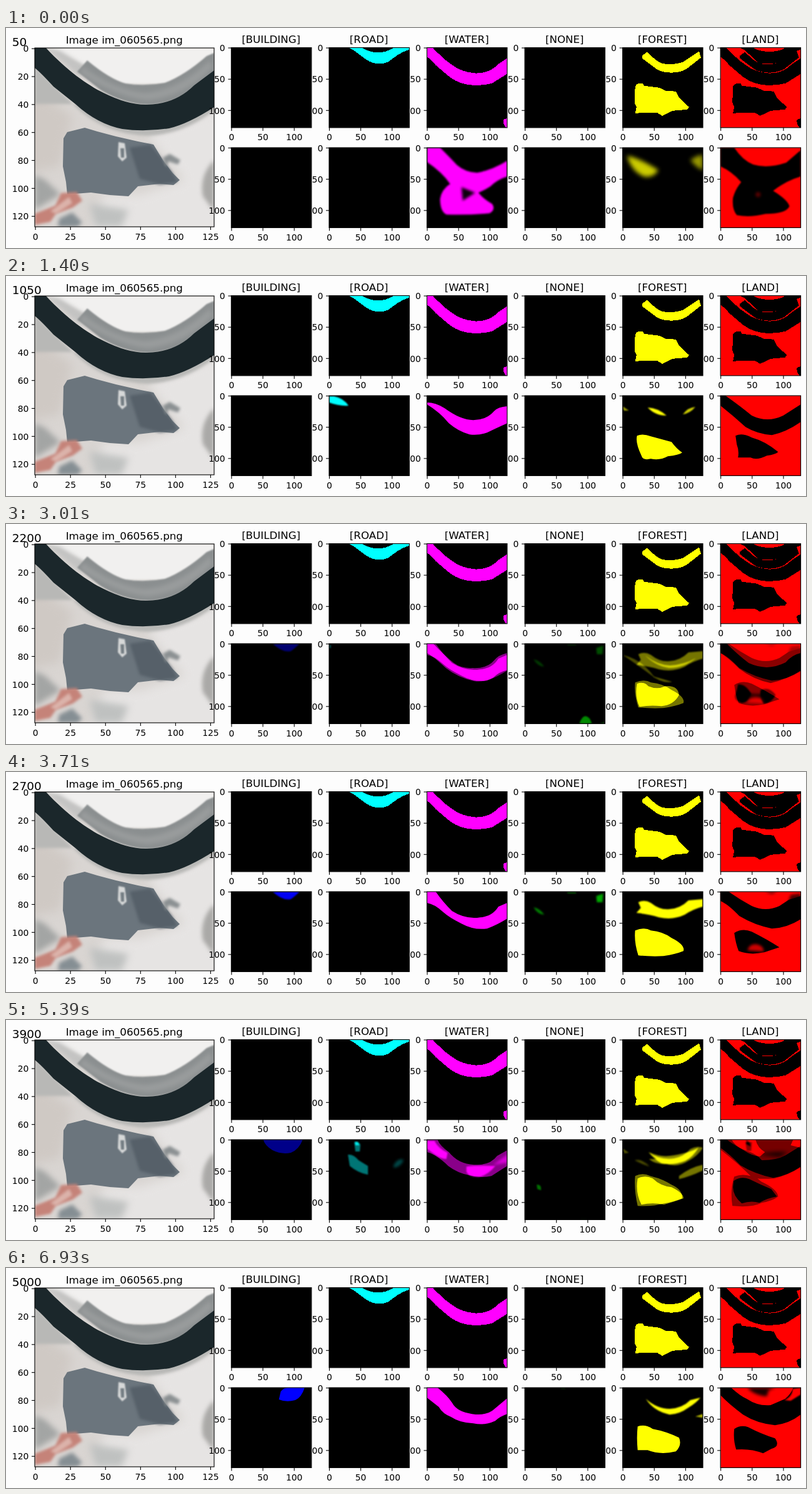
An HTML page that plays this animation: 1280x353 px, repeating every 7 s.

```html
<!DOCTYPE html>
<html lang="en">
<head>
<meta charset="utf-8">
<title>Segmentation training</title>
<style>
  html, body { margin: 0; width: 100%; height: 100%; overflow: hidden; background: #fdfdfd; }
  svg { display: block; }
  text { font: 13.89px "DejaVu Sans", sans-serif; }
  .title { font-size: 16.67px; text-anchor: middle; }
  .counter { font-size: 18.5px; }
</style>
</head>
<body>
<svg id="stage" width="1280" height="353" viewBox="0 0 1280 353"></svg>
<script>
const STEP_MS = 70, STEPS = 100, SIZE = 128.4, TOP = 31.5, BOTTOM = 192;
const stage = document.getElementById('stage');
const panels = [
  ['building', '#00f'], ['road', '#0ff'], ['water', '#f0f'],
  ['none', '#0f0'], ['forest', '#ff0'], ['land', '#000']
].map(([name, color], i) => ({ name, color, x: 360.4 + 156.55 * i, back: name === 'land' ? '#f00' : '#000' }));

function add(parent, tag, attrs, text) {
  const el = document.createElementNS('http://www.w3.org/2000/svg', tag);
  for (const key in attrs) el.setAttribute(key, attrs[key]);
  if (text !== undefined) el.textContent = text;
  return parent.appendChild(el);
}

const truth = {
  road: ['M31 0H52Q66 8 78 8T104 0H128V3C112 8 104 16 94 23Q80 29 64 22C50 14 42 4 31 0Z'],
  water: [
    'M0 0H9C18 9 28 20 42 29Q55 39 78 41Q100 41 113 27L128 17V42Q112 52 104 57Q84 62 64 59Q45 56 28 40L14 28Q6 18 0 15Z',
    'M122 115L128 113V128H126Q121 122 122 115Z'
  ],
  forest: [
    'M31 13L39 7Q54 22 62 25Q78 29 96 23L122 6L125 16L102 34Q92 40 78 40Q64 40 55 35L31 17Z',
    'M20 62L23 58L32 57L34 61L58 64L69 69L85 70L90 80L97 87L106 95L103 99L80 101L72 105L63 109L55 104L35 104L20 105L22 95L19 88Z'
  ]
};
truth.land = [...truth.road, ...truth.water, ...truth.forest, 'M40 5L52 1Q78 12 104 1L122 6L96 24L62 26Z'];

// Each shape is a path, or [path, blur, opacity, color].
const keys = [
  { step: 0,
    water: [
      ['M0 0H21Q38 17 48 28Q62 40 80 40Q104 36 128 21V46Q112 51 101 62Q92 68 82 72Q90 82 104 90Q110 99 100 105Q64 108 31 107Q21 102 21 82Q23 67 37 58Q24 39 0 23Z', 1.4],
      ['M55 63L77 72L57 85Z', 2.2, .95, '#000']],
    forest: [['M7 13Q25 16 57 36Q49 49 34 46Q14 38 7 13Z', 3.5, .8], ['M108 20Q120 11 128 12V36Q119 33 108 20Z', 3.5, .6]],
    land: [
      ['M0 0H22Q35 20 52 27Q75 34 105 24L128 4V46Q104 53 84 69Q108 84 110 94Q104 106 72 106Q47 112 26 108Q18 98 20 80Q24 66 33 55Q18 38 0 30Z', 1],
      ['M56 75a4 4 0 1 0 8 0a4 4 0 1 0 -8 0Z', 2, .35, '#f00']] },
  { step: 20,
    road: [['M0 1H8Q23 4 31 16Q16 17 0 11Z', .8]],
    water: ['M0 11Q14 11 28 20Q55 40 76 39Q96 38 107 25Q113 18 128 17V44Q108 53 96 59Q82 64 68 62Q50 57 35 44Q20 26 0 14Z'],
    forest: [
      ['M0 17L10 24L2 24Z', 1, .6], ['M40 19Q57 20 70 32Q52 32 40 19Z', .8], ['M96 30Q104 19 116 18Q108 28 96 30Z', .8, .8],
      'M23 64Q32 60 45 65L78 74Q86 85 95 91Q90 95 72 97Q60 104 45 101Q32 104 30 96Q20 75 23 64Z'],
    land: [
      'M0 0H8Q32 17 50 32Q75 44 100 32L128 14V42Q105 58 82 63Q58 61 40 50Q20 32 0 16Z',
      'M24 64Q35 59 50 67Q72 73 92 90Q88 94 74 96Q58 104 48 99L28 99Q30 88 26 78Z'] },
  { step: 34,
    road: [['M0 2H3V7H0Z', 1, .5]],
    water: ['M0 0H10Q28 19 43 31Q55 40 73 39Q96 40 107 27Q114 18 128 15V42Q115 45 106 54Q92 62 76 60Q50 55 30 39Q10 20 0 15Z'],
    none: [['M87 128Q91 116 97 116Q104 117 107 128Z', 1], ['M118 128L128 125V128Z', 1, .5]],
    forest: [
      ['M0 18Q26 24 44 45L53 56Q35 42 0 18Z', 1, .55], ['M36 19Q55 34 76 35Q100 33 117 23Q98 39 74 39Q53 36 36 19Z', .8, .65],
      ['M48 52Q62 56 79 61Q64 64 48 52Z', .8, .7],
      'M23 64Q34 60 41 68Q55 74 68 68Q88 66 90 82Q82 98 62 100Q44 98 27 101Q19 84 23 64Z'],
    land: [
      'M0 0H10Q28 18 45 31Q75 45 104 30Q114 18 128 15V43Q106 57 80 63Q52 57 30 40Q12 22 0 15Z',
      ['M28 65Q40 64 49 80Q45 94 34 95Q23 92 23 84Q26 75 28 65Z', 1], ['M64 74Q78 68 88 82Q82 95 69 96Q62 87 64 74Z', 1],
      ['M43 78Q58 83 72 78V90Q58 84 43 90Z', 2, .75]] },
  { step: 53,
    building: [['M66 0H109Q101 8 95 12Q82 15 66 0Z', .8, .95]],
    water: ['M0 0H14Q25 16 40 31Q62 45 85 41Q104 40 114 24L128 18V43Q112 53 96 59Q75 62 55 51Q36 42 25 32Q12 20 0 18Z'],
    none: [['M14 25Q24 27 31 37Q20 36 14 25Z', 1.8, .5], ['M114 7L125 3L124 17H115Z', 1.8, .65], ['M66 0H82V3H69Z', 1, .3]],
    forest: [
      ['M25 17Q35 12 45 18Q60 30 75 28Q92 27 105 14L128 12V24Q112 28 99 37Q80 46 58 41Q42 36 22 34L29 26Z', 1.2],
      'M20 62Q35 56 45 62Q65 64 78 74Q100 85 97 95Q85 100 65 103Q45 104 25 102Q18 80 20 62Z'],
    land: [
      'M0 0H13Q31 13 50 23Q72 33 94 23L109 13L128 7V44Q106 58 82 59Q55 54 30 39Q12 20 0 15Z',
      ['M16 8Q31 12 37 23L25 23Z', 3, .85], ['M70 0H91L82 4Z', 2, .6], ['M112 5L128 3V14L107 19Z', 2, .7],
      'M22 66Q35 58 50 64Q74 76 94 89Q82 93 70 97Q47 102 29 95Q24 82 22 66Z',
      ['M43 94Q46 83 57 84Q69 86 69 96Z', 2, .8, '#f00']] },
  { step: 66,
    road: [['M40 4Q46 1 50 8L49 19H42Z', 1], ['M30 24Q39 23 47 33L62 42V56Q46 53 33 42Z', 1], ['M103 41Q109 29 119 32Q115 44 103 45Z', 2, .6]],
    water: [['M0 2H12Q18 14 33 21L31 31Q19 31 0 14Z', 1], ['M63 43Q80 41 109 42Q99 55 83 60Q67 61 63 51Z', 1], ['M105 41Q119 31 128 24V37Q116 38 105 41Z', 2, .7]],
    forest: [
      ['M40 20Q60 33 82 30Q98 27 108 15Q118 9 128 13Q120 26 105 34Q88 45 70 39Q52 40 42 31L54 31Z', .9],
      ['M90 58Q108 44 128 40V49Q110 58 90 63Z', 1], ['M0 14L10 21L3 22Z', 1, .7], ['M19 33Q30 30 43 43Q29 38 19 33Z', 1.5, .7],
      'M20 58Q32 52 44 58Q62 62 78 72Q96 80 95 94Q80 100 66 102Q50 107 24 106Q18 80 20 58Z'],
    land: [
      'M0 0H10Q28 13 42 18Q58 23 66 33Q90 33 104 25L128 10V44Q107 57 86 62Q65 63 59 62L65 67Q91 79 92 91Q83 98 66 101Q50 109 19 106Q15 80 22 59Q34 54 48 58Q28 38 0 16Z',
      ['M40 4H50L49 18H42Z', 1], ['M60 24Q80 18 108 20L94 28Z', 3, .8]] },
  { step: 87,
    building: ['M51 0H114Q108 16 95 21Q80 24 66 17Q54 10 51 0Z'],
    road: [['M41 4Q47 2 48 9L42 9Z', 1, .85]],
    water: ['M0 0H17Q20 9 35 20Q50 39 75 40Q100 42 112 26L128 17V42Q112 52 103 58Q87 62 68 57Q48 53 34 42Q14 23 0 20Z'],
    none: [['M19 72Q27 71 26 81L20 79Z', 1.3, .8], ['M89 127H99V128H89Z', 1, .2]],
    forest: [
      ['M42 20Q60 28 75 26Q105 22 121 13Q112 28 100 34Q80 42 62 38Q48 30 42 20Z', .8],
      'M24 62Q36 56 48 62Q60 74 78 76Q98 86 97 94Q80 100 66 104Q48 100 30 104Q20 85 24 62Z'],
    land: [
      'M0 0H18Q22 9 37 17Q50 26 63 27L71 20Q59 13 56 0H116L112 9L128 13V43Q108 57 84 61Q55 55 32 41Q13 22 0 13Z',
      ['M41 0Q47 2 48 11L41 7Z', 1.2],
      'M21 66Q32 58 46 63Q64 72 81 79L90 91Q76 93 62 101Q49 97 34 102Q20 90 20 76Z'] },
  { step: 99,
    building: ['M76 19L79 6Q84 0 90 0H117Q112 16 102 20Q88 24 76 19Z'],
    water: ['M0 0H17Q33 13 40 24Q48 39 72 42Q96 46 109 33L128 17V42Q116 46 109 53Q92 61 74 57Q52 56 39 47Q25 42 19 31L0 16Z'],
    none: [['M57 0H65V2H58Z', 1, .2]],
    forest: [
      ['M37 18Q55 34 75 34Q95 33 108 20L124 16Q118 24 105 32Q90 43 75 43Q50 38 37 18Z', 1], ['M116 46L128 42V48Z', 1, .7],
      'M24 62Q36 58 48 66Q70 70 90 80Q95 92 85 102Q60 108 40 100L24 100Q22 80 24 62Z'],
    land: [
      'M0 0H17Q31 13 42 18Q60 30 80 28L103 18Q112 11 116 0H128V43Q110 57 87 60Q58 57 36 43Q13 26 0 12Z',
      ['M43 0Q53 12 74 14L77 4L88 0Z', 2.5, .9],
      ['M102 20Q115 14 115 2L128 0V11L112 21Z', 1, 1, '#f00'],
      'M22 66Q32 59 44 63Q65 74 87 81Q96 94 81 98L68 105Q48 97 25 99Q20 83 22 66Z'] }
];

function drawPanels(parent, shapes, y, crisp) {
  for (const p of panels) {
    const box = add(parent, 'svg', { x: p.x, y, width: SIZE, height: SIZE, viewBox: '0 0 128 128', overflow: 'hidden' });
    add(box, 'rect', { width: 128, height: 128, fill: p.back });
    for (const shape of shapes[p.name] || []) {
      const [d, blur = .45, opacity = 1, fill = p.color] = [].concat(shape);
      const path = add(box, 'path', { d, fill, opacity });
      if (crisp) path.setAttribute('shape-rendering', 'crispEdges');
      else path.style.filter = `blur(${blur}px)`;
    }
  }
}

function drawAxes(x, y, size, xTicks, yTicks) {
  const unit = size / 128, line = { fill: 'none', stroke: '#000', 'stroke-width': 1.1 };
  add(stage, 'rect', { x, y, width: size, height: size, ...line });
  for (const v of xTicks) {
    const tx = x + (v + .5) * unit;
    add(stage, 'path', { d: `M${tx} ${y + size}v5`, ...line });
    add(stage, 'text', { x: tx, y: y + size + 20.5, 'text-anchor': 'middle' }, v);
  }
  for (const v of yTicks) {
    const ty = y + (v + .5) * unit;
    add(stage, 'path', { d: `M${x} ${ty}h-5`, ...line });
    add(stage, 'text', { x: x - 9.7, y: ty + 5.2, 'text-anchor': 'end' }, v);
  }
}

function drawAerial() {
  const view = add(stage, 'svg', { x: 46, y: 32, width: 287, height: 287, overflow: 'hidden' });
  const shape = (fill, d, blur = .7, opacity = 1) => {
    add(view, 'path', { d, fill, opacity }).style.filter = `blur(${blur}px)`;
  };
  shape('#d9d5d2', 'M-9 -9H300V300H-9Z', 0);
  shape('#e6e4e3', 'M180 140L300 95V300H90L110 236L170 235L240 212Z', 8);
  shape('#cfc9c4', 'M-9 60L60 110L40 190L-9 200Z', 8);
  shape('#f1f0ef', 'M20 0H287V12L215 58H140Z', 2);
  shape('#c3c3c2', 'M18 0L40 4L82 30L72 45Z', 3);
  shape('#b8b8b6', 'M0 30L65 94Q110 138 180 141Q240 138 287 100V90H0Z', 2);
  shape('#8b8f90', 'M68 38L84 20Q120 50 145 57Q175 62 208 56Q240 44 275 13L287 8V38L255 64Q225 90 180 91Q140 89 105 67Z', 1);
  shape('#a6a8a8', 'M78 30Q125 66 175 72Q230 68 280 20L284 32Q240 78 180 84Q130 78 72 40Z', 3, .5);
  shape('#1b272b', 'M0 0H18C50 35 85 60 110 72Q150 92 180 91Q225 90 255 60L287 36V95Q245 122 215 129Q175 135 140 130Q100 122 65 90L30 62Q10 40 0 32Z');
  shape('#6b757d', 'M46 145L52 135L80 128L100 134L130 142L165 150L190 155L205 180L220 200L232 212L222 220L200 218L165 222L150 238L120 236L90 232L52 235L50 215L45 190Z');
  shape('#566069', 'M152 160L185 155L205 180L220 200L228 215L200 219L168 210Z', 2);
  shape('#d6d8d8', 'M134 151L144 153L147 176L140 182L133 174Z', 1.2);
  shape('#747d83', 'M137 161H143V176H138Z', 1);
  shape('#8b9092', 'M205 176L216 170L233 180L229 187L214 182L210 191Z', 2);
  shape('#a3a5a4', 'M0 204L17 212L41 235L0 260Z', 5);
  shape('#c58379', 'M0 266L33 253L42 233L67 231L76 245L61 256L34 266L25 279L0 284Z', 2);
  shape('#e5c8c0', 'M25 262L55 239L60 249L34 266Z', 2, .7);
  shape('#858e93', 'M39 274L60 264L76 280L68 287H37Z', 3);
  shape('#bfc1c0', 'M88 250L150 260L139 287H96Z', 6);
  shape('#aaa9a7', 'M287 180Q263 204 269 238L287 262Z', 3);
}

drawAerial();
drawPanels(stage, truth, TOP, true);
for (const key of keys) {
  key.group = add(stage, 'g', {});
  drawPanels(key.group, key, BOTTOM);
}
drawAxes(46, 32, 287, [0, 25, 50, 75, 100, 125], [0, 20, 40, 60, 80, 100, 120]);
add(stage, 'text', { class: 'title', x: 189.3, y: 24.5 }, 'Image im_060565.png');
for (const p of panels) {
  for (const y of [TOP, BOTTOM]) drawAxes(p.x, y, SIZE, [0, 50, 100], [0, 50, 100]);
  add(stage, 'text', { class: 'title', x: p.x + SIZE / 2 - .5, y: 23.5 }, `[${p.name.toUpperCase()}]`);
}
const counter = add(stage, 'text', { class: 'counter', x: 9.8, y: 29.3 });

let shown = -1;
function render(ms) {
  const step = Math.floor(ms / STEP_MS + 1e-6) % STEPS;
  if (step === shown) return;
  shown = step;
  counter.textContent = 50 * (step + 1);
  const current = keys.findLastIndex(key => key.step <= step);
  const from = keys[current], to = keys[current + 1];
  const u = to ? (step - from.step) / (to.step - from.step) : 0;
  keys.forEach((key, i) => {
    const opacity = i === current ? 1 : i === current + 1 ? u * u * (3 - 2 * u) : 0;
    key.group.setAttribute('display', opacity ? 'inline' : 'none');
    key.group.setAttribute('opacity', opacity);
  });
}

render(0);
const start = performance.now();
requestAnimationFrame(function tick(now) {
  render(Math.max(0, now - start));
  requestAnimationFrame(tick);
});
</script>
</body>
</html>
```
